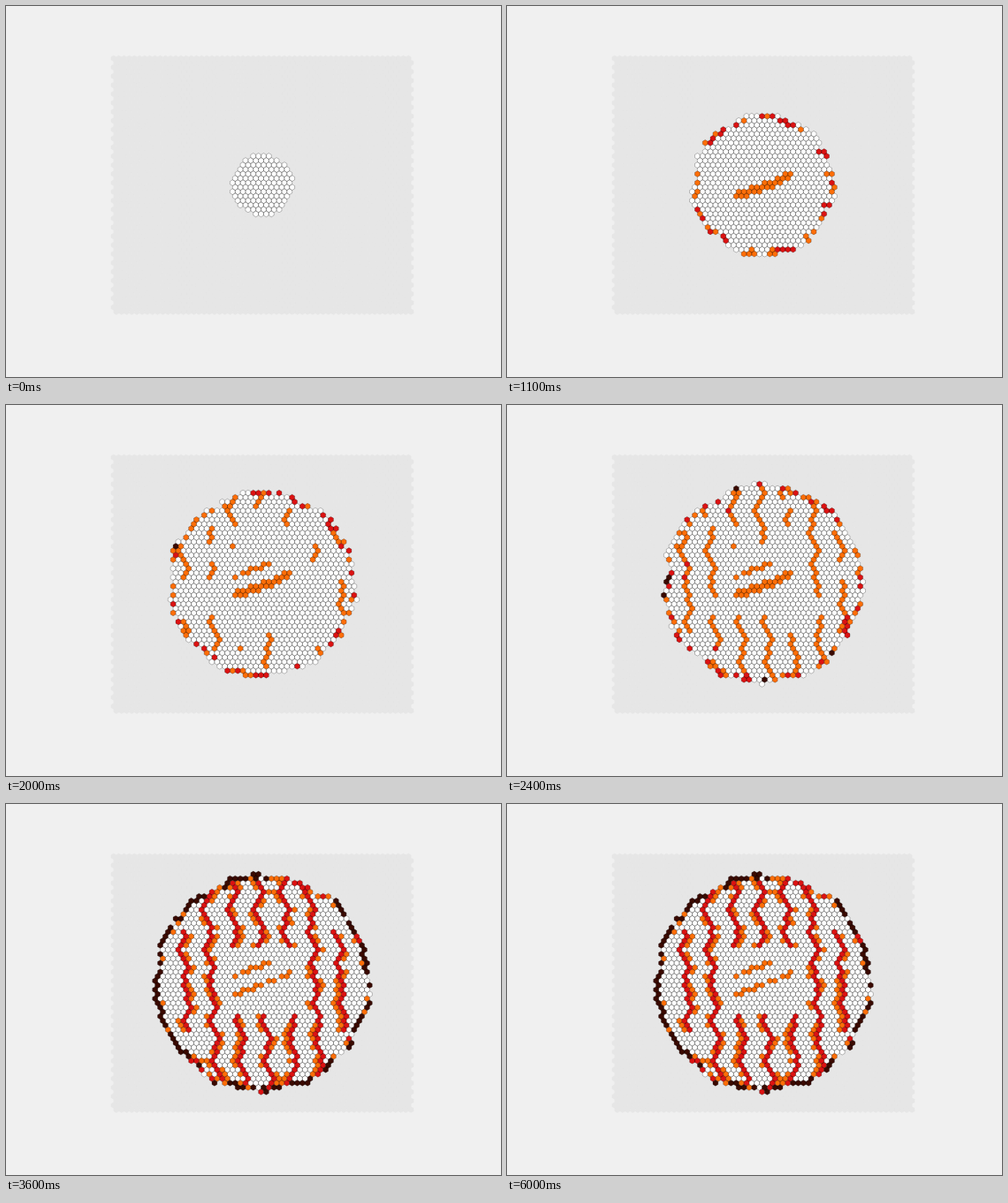
Recreate the animation shown at these times as an HTML page with a canvas. Size 560 by 420 pixels, loop 6.1 s.

```html
<!DOCTYPE html>
<html lang="en">
<head>
<meta charset="utf-8">
<title>Hexagonal cell growth</title>
<style>
html, body { margin: 0; width: 100%; height: 100%; overflow: hidden; background: #f0f0f0; }
canvas { display: block; }
</style>
</head>
<body>
<canvas id="stage" width="560" height="420"></canvas>
<script>
const ctx = document.getElementById('stage').getContext('2d');
const LOOP = 6100, TICK = 100, GROWTH = 3600;
const SIZE = 58, DX = 5.85, DY = 5.03, SIDE = 3.36;
const CENTER_X = 290, CENTER_Y = 202.7;
const WHITE = 0, ORANGE = 1, RED = 2, BLACK = 3;
const COLORS = ['#ffffff', '#ff6e08', '#dc1212', '#3a0a00'];

const ramp = (t, from, to) => Math.min(1, Math.max(0, (t - from) / (to - from)));
const mix = (a, b, p) => a + (b - a) * p;

function hash(a, b, salt) {
  const n = Math.sin(a * 127.1 + b * 311.7 + salt * 74.7) * 43758.5453;
  return n - Math.floor(n);
}

// Triangle wave between -1 and 1 with its peak at phase 0.
function zigzag(phase) {
  return 4 * Math.abs(phase - Math.floor(phase) - .5) - 1;
}

// Seven leaning zigzag stripes, numbered -3 to 3 from left to right.
function stripeX(n, y) {
  const mirror = n > 0 ? 1 : -1;
  return 291 + 29.3 * n + .06 * (y - 200) + mirror * 4 * zigzag((y - 205) / 42);
}

function stripeReaches(n, y) {
  if (Math.abs(n) < 2) return y < 162 || y > 236;
  return Math.abs(n) < 3 || (y > 140 && y < 260);
}

function findStripe(x, y, row) {
  for (let n = -3; n <= 3; n++) {
    if (!stripeReaches(n, y)) continue;
    const offset = x - stripeX(n, y);
    const block = Math.floor(row / 4);
    const core = Math.abs(offset) <= DX / 2;
    const side = hash(n, block, 6) < .5 ? -1 : 1;
    const halo = !core && Math.abs(offset - side * DX) <= DX / 2 && hash(n, row, 5) < .75;
    if (core || halo) return { core, delay: hash(n, block, 7) };
  }
  return null;
}

// Two slanted bars in the middle; the lower one is older and starts out thick.
function barLevel(x, y, time) {
  const lower = 216 - .38 * (x - 259);
  const spread = time < 3000 ? 5 : 2.6;
  const onLower = time > 700 && x > 257 && x < 323 && Math.abs(y - lower) < spread;
  const onUpper = time > 1800 && x > 257 && x < 302 && Math.abs(y - lower + 22) < 2.6;
  return onLower || onUpper ? ORANGE : WHITE;
}

function stripeLevel(cell, time) {
  if (!cell.stripe) return WHITE;
  const heat = ramp(time, 1000, GROWTH) + .3 * cell.distance / 120 - .4 * cell.stripe.delay;
  if (!cell.stripe.core) return heat > .75 ? ORANGE : WHITE;
  return heat > .72 ? RED : heat > .4 ? ORANGE : WHITE;
}

function rimLevel(cell, depth, time) {
  const age = ramp(time, 1200, GROWTH);
  if (depth > 4.5) return depth < 9 && cell.luck < .22 * age ? ORANGE : WHITE;
  const black = .62 * age * age;
  const red = black + mix(.45, .08, age) * ramp(time, 0, 700);
  const orange = red + .15 * ramp(time, 0, 1000);
  return cell.luck < black ? BLACK : cell.luck < red ? RED : cell.luck < orange ? ORANGE : WHITE;
}

function hexagon(path, x, y) {
  const half = DX / 2;
  path.moveTo(x, y - SIDE);
  path.lineTo(x + half, y - SIDE / 2);
  path.lineTo(x + half, y + SIDE / 2);
  path.lineTo(x, y + SIDE);
  path.lineTo(x - half, y + SIDE / 2);
  path.lineTo(x - half, y - SIDE / 2);
  path.closePath();
}

function makeCell(col, row) {
  const x = CENTER_X + (col - SIZE / 2 + .25 + (row & 1) / 2) * DX;
  const y = CENTER_Y + (row - (SIZE - 1) / 2) * DY;
  const angle = Math.atan2(y - CENTER_Y, x - CENTER_X);
  return {
    x, y,
    distance: Math.hypot(x - CENTER_X, y - CENTER_Y),
    wobble: 1.5 * Math.sin(7 * angle + 1) + 1.5 * Math.sin(13 * angle) + 4 * (hash(col, row, 1) - .5),
    luck: mix(hash(col, row, 3), hash(col >> 1, row >> 2, 4), .4),
    stripe: findStripe(x, y, row)
  };
}

const cells = Array.from({ length: SIZE * SIZE }, (_, i) => makeCell(i % SIZE, Math.floor(i / SIZE)));
const field = new Path2D();
cells.forEach(cell => hexagon(field, cell.x, cell.y));

function paint(path, color) {
  ctx.fillStyle = color;
  ctx.fill(path);
  ctx.stroke(path);
}

function draw(time) {
  const radius = 35 + 87 * (1 - (1 - ramp(time, 0, GROWTH)) ** 2);
  const roughness = ramp(time, 0, 500);
  const layers = COLORS.map(() => new Path2D());

  for (const cell of cells) {
    const depth = radius + cell.wobble * roughness - cell.distance;
    if (depth < 0) continue;
    const level = Math.max(
      barLevel(cell.x, cell.y, time), stripeLevel(cell, time), rimLevel(cell, depth, time)
    );
    hexagon(layers[level], cell.x, cell.y);
  }

  ctx.fillStyle = '#f0f0f0';
  ctx.fillRect(0, 0, 560, 420);
  ctx.lineWidth = .5;
  ctx.strokeStyle = '#e6e6e6';
  paint(field, '#e6e6e6');
  ctx.strokeStyle = 'rgba(0, 0, 0, .5)';
  layers.forEach((layer, level) => paint(layer, COLORS[level]));
}

let start = null, shown = -1;
function animate(now) {
  if (start === null) start = now;
  const time = Math.floor((now - start) % LOOP / TICK) * TICK;
  if (time !== shown) draw(shown = time);
  requestAnimationFrame(animate);
}
draw(0);
requestAnimationFrame(animate);
</script>
</body>
</html>
```
